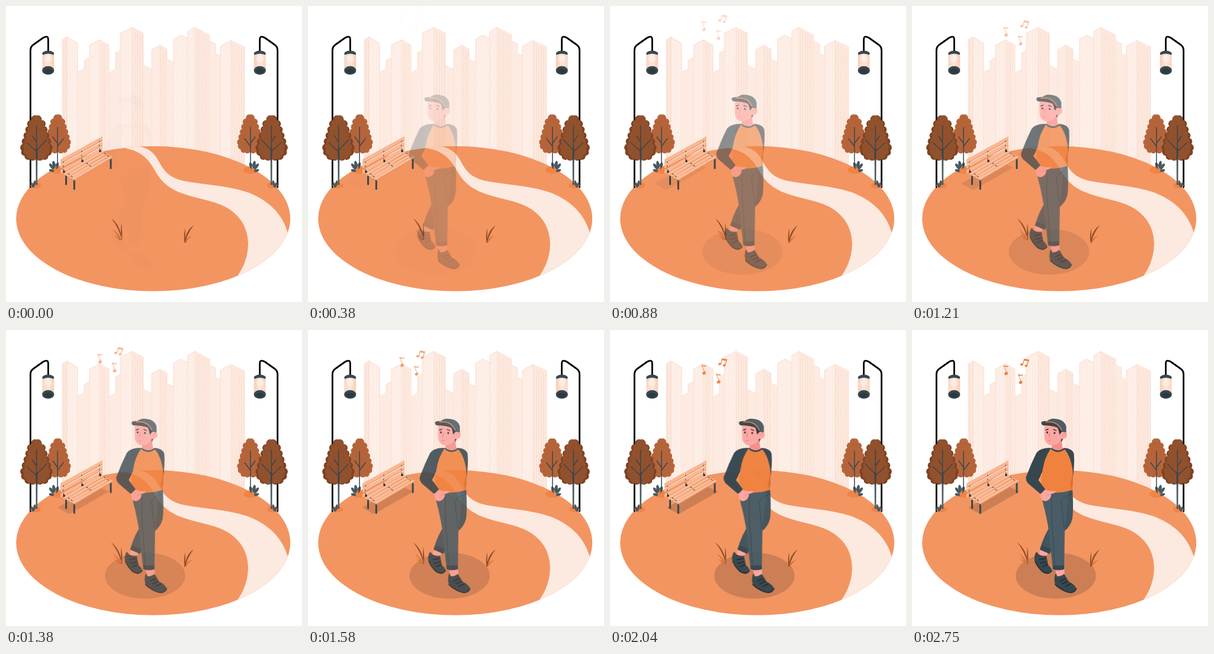
An HTML page without scripts that plays this animation: 500x500 px, repeating every 2830 ms.

```html
<!DOCTYPE html>
<html lang="en">
<head>
<meta charset="utf-8">
<title>Walk in the park</title>
<style>
  html, body { margin: 0; width: 100%; height: 100%; overflow: hidden; background: #fff; }
  svg { display: block; width: 100%; height: 100%; }
  .line { fill: none; stroke-linecap: round; stroke-linejoin: round; }

  .walker, .shadow, .notes { animation: slide 2830ms ease-out infinite both; }
  .walker { animation-timing-function: linear(.02, .27 13.4%, .57 31.1%, .725 42.8%, .87 55.8%, .98 72.1%, 1 84%, 1); }
  .shadow { animation-timing-function: linear(0, .07 13.4%, .36 31.1%, .61 42.8%, .87 55.8%, 1 65%, 1.035 73%, 1.02 84%, 1 97%, 1); }
  .notes { --from: translateY(-50px); animation-timing-function: linear(0, 0 11%, 1 73%, 1); }
  @keyframes slide {
    from { opacity: 0; transform: var(--from, translateX(-30px)); }
    to { opacity: 1; transform: none; }
  }
</style>
</head>
<body>
<svg viewBox="0 0 500 500">
  <defs>
    <linearGradient id="glass">
      <stop offset="0" stop-color="#fbd5c2"/>
      <stop offset=".5" stop-color="#fde6db"/>
      <stop offset="1" stop-color="#f9cdb6"/>
    </linearGradient>
    <pattern id="winL" width="4" height="4" patternUnits="userSpaceOnUse" patternTransform="skewY(-27)">
      <path d="M.8 1h2.2v1.6h-2.2z" fill="#fff" opacity=".75"/>
    </pattern>
    <pattern id="winR" width="4" height="4" patternUnits="userSpaceOnUse" patternTransform="skewY(27)">
      <path d="M.8 1h2.2v1.6h-2.2z" fill="#f7cbb5" opacity=".85"/>
    </pattern>
    <clipPath id="land"><ellipse cx="248.7" cy="359.3" rx="231.5" ry="122.5"/></clipPath>

    <!-- half of a lobed tree crown, around x = 0 -->
    <path id="half" d="M-1 0H0a7 7 0 0 1 9 8a6 6 0 0 1 5 10a6 6 0 0 1 3 10a6 6 0 0 1 3 10a6 6 0 0 1 3 10a6.500 6.500 0 0 1 2 11a6 6 0 0 1-5 9a6 6 0 0 1-9 6a7 7 0 0 1-11-1h-1z"/>
    <g id="crown"><use href="#half"/><use href="#half" transform="scale(-1 1)"/></g>

    <g id="side">
      <path class="line" d="M41.300 306V75q0-6.500 5.500-10L63 53.500q8.300-4.500 8.300 3V78" stroke="#000" stroke-width="2.800"/>
      <ellipse cx="71.200" cy="80.500" rx="10" ry="5" fill="#37474f"/>
      <path d="M61.200 83q10-5 20 0v25h-20z" fill="url(#glass)"/>
      <circle cx="71" cy="89" r="6" fill="#fff3ec" opacity=".6"/>
      <ellipse cx="71.200" cy="108.800" rx="10.200" ry="7.200" fill="#37474f"/>
      <ellipse cx="71.200" cy="110" rx="7" ry="4" fill="#2c3a42"/>

      <ellipse cx="88" cy="277" rx="11" ry="6" fill="#f08446"/>
      <g fill="#455a64">
        <ellipse cx="77" cy="271" rx="2.500" ry="6" transform="rotate(-38 77 271)"/>
        <ellipse cx="81" cy="268" rx="2.700" ry="6.500" transform="rotate(-10 81 268)"/>
        <ellipse cx="86" cy="270" rx="2.700" ry="6" transform="rotate(20 86 270)"/>
        <ellipse cx="77" cy="278" rx="4.500" ry="2.300" transform="rotate(15 77 278)"/>
      </g>
      <path d="M80 283q1-8 5-14q0 8-1 14zM86 283q2-6 8-9q-2 7-5 10z" fill="#f08446"/>
      <use href="#crown" transform="translate(87.500 183.500) scale(.81 .86)" fill="#b5643a"/>
      <path class="line" d="M87 205v66M87 237l10-13M87 232l-8-11" stroke="#37474f" stroke-width="1.500"/>

      <ellipse cx="50" cy="303" rx="9" ry="5" fill="#f08446"/>
      <g fill="#455a64">
        <ellipse cx="44" cy="302" rx="2" ry="5.500" transform="rotate(-25 44 302)"/>
        <ellipse cx="48" cy="300" rx="2" ry="5.500" transform="rotate(10 48 300)"/>
      </g>
      <path d="M47 307q3-6 11-6q-4 5-9 7z" fill="#f08446"/>
      <use href="#crown" transform="translate(51.300 185)" fill="#7c4324"/>
      <use href="#crown" transform="translate(51.800 185) scale(.84 .98)" fill="#92512d"/>
      <path d="M50.300 240h3l-.3 62h-2.400z" fill="#37474f"/>
      <path d="M52 262v38" stroke="#7d8478" stroke-width=".7"/>
      <path class="line" d="M51.600 202v50M51.500 244l17-18M51.500 246l-16-15M51.500 230l-7-11" stroke="#37474f" stroke-width="1.500"/>
    </g>

    <g id="slat">
      <path d="M0 0L71-39v6L0 6.500z" fill="#fab792"/>
      <path d="M0 6.500L71-33v1.400L0 8z" fill="#e98d5c"/>
    </g>
    <g id="plank">
      <path d="M0 0L66-38l4 2L4 3z" fill="#fbbd9a"/>
      <path d="M4 3L70-36v1.300L4 4.500z" fill="#e98d5c"/>
    </g>
    <g id="brace">
      <path class="line" d="M0 0v1.500M-.3 7v1.500M0 13l.8 3M8 20.500l2 1M13 24.500l2 1" stroke="#37474f" stroke-width="1.200"/>
      <circle cx="1" cy="17" r="1.900" fill="#263238"/>
    </g>
    <g id="note">
      <ellipse cx="5" cy="13.500" rx="3.100" ry="2.500" transform="rotate(-25 5 13.500)" fill="#ef8142"/>
      <path d="M7 13L2 2q4 1 7-.5L8.500.2Q4 1.500 0-.7L5.800 13z" fill="#ef8142"/>
    </g>
  </defs>

  <g id="city">
    <path d="M95 290V57l8-5 18 11v49l11-6V92l9-5V66l17-9 16 9v47l11-6V79l8-4V46l20-10 19 10v54l14 7V74l14-8 12 7v17l11 5V56l12-7 12 6V43l12-7 25 13v10l10 5v16l8 4V68l18-10 23 11v221z" fill="#fdebe2" stroke="#f9d8c8" stroke-width=".8"/>
    <path d="M104 55l16 9v226h-16zM142 67l16-8v231h-16zM194 47l18-9v252h-18zM284 57l11-6 11 6v233h-22zM308 44l11-6v252h-11zM363 69l16-9v230h-16z" fill="url(#winL)"/>
    <path d="M96 58l7-4v236h-7zM160 61l10 5v224h-10zM214 39l17 8v243h-17zM261 69l10 5v216h-10zM321 39l21 11v240h-21zM381 61l21 10v219h-21z" fill="url(#winR)"/>
    <path class="line" d="M103 52v238M121 112v178M141 87v203M158 57v233M174 113v177M193 75v215M213 36v254M232 100v190M246 107v183M260 66v224M283 95v195M307 55v235M319 36v254M344 59v231M362 84v206M380 58v232" stroke="#f9dccd" stroke-width=".7"/>
  </g>

  <g clip-path="url(#land)">
    <path d="M0 220h500v280H0z" fill="#f39561"/>
    <path d="M190 239C222 241 236 254 246 269C257 287 264 302 291 314C320 326 347 327 370 339C396 353 409 375 409 403Q408 435 387 461L500 480V420L476 383C466 348 440 326 406 314C372 303 335 302 303 296C278 291 268 281 259 264C251 250 245 239 214 235z" fill="#fce9df"/>
  </g>

  <g class="shadow" fill="#cc7f54">
    <ellipse cx="243" cy="415" rx="67.800" ry="39"/>
    <path d="M95 300l65-37 22 10-67 38z"/>
  </g>

  <use href="#side"/>
  <use href="#side" transform="translate(500) scale(-1 1)"/>

  <g id="bench">
    <path class="line" d="M101.500 288v13M115.300 294v15M177 259v15" stroke="#37474f" stroke-width="3"/>
    <use href="#slat" x="92" y="259"/>
    <use href="#slat" x="92" y="268"/>
    <use href="#slat" x="92" y="277"/>
    <use href="#plank" x="96" y="282.500"/>
    <use href="#plank" x="101" y="285.500"/>
    <use href="#plank" x="106" y="288.500"/>
    <use href="#plank" x="111" y="291"/>
    <use href="#brace" x="97" y="263"/>
    <use href="#brace" x="128" y="245"/>
    <use href="#brace" x="158" y="228"/>
  </g>

  <g id="grass">
    <path d="M195 396q-2-10-15-19q10 12 12 17zM194 395q-4-7-12-8q7 4 9 9z" fill="#d9743a"/>
    <path d="M195.500 395Q194 371 177.500 358.500Q190 373 195.500 395zM194.500 395Q193.500 378 195 366Q197 381 196 395z" fill="#8f4e2a"/>
    <path d="M302 400q2-9 13-12q-8 6-11 12z" fill="#d9743a"/>
    <path d="M302 400Q303 380 317 370.500Q307 383 302.500 400zM301.500 400Q299.500 386 303 375.500Q302.500 387 303 400z" fill="#8f4e2a"/>
  </g>

  <g class="notes">
    <use href="#note" x="154" y="60"/>
    <use href="#note" x="178.500" y="75"/>
    <path class="line" d="M187 59l2.500-9 7.500 1.300-3 9.500" stroke="#ef8142" stroke-width="1.200"/>
    <path d="M189 48.500l9 1.500-.8 3-8.500-1.500z" fill="#ef8142"/>
    <g fill="#ef8142"><ellipse cx="185.300" cy="58.300" rx="2.400" ry="2"/><ellipse cx="192.800" cy="60.500" rx="2.400" ry="2"/></g>
  </g>

  <g class="walker">
    <!-- back leg and shoe -->
    <path d="M217 370l-2 10 12 3 3-8z" fill="#fca6a2"/>
    <path d="M209 376Q205 385 208 392Q213 403 220 409Q231 416 236.500 407Q236 402 230 397L227 381Q219 383 213 378Q212 374 209 376z" fill="#37474f"/>
    <path class="line" d="M208 391Q213 402 221 408Q230 414 236 407" stroke="#263238" stroke-width="1.800"/>
    <path class="line" d="M215 388l10-2M217 394l10-2.500M220 400l9-4" stroke="#20292f" stroke-width="1.500"/>
    <path d="M240 277L271 268Q273 300 271 318Q268 332 256 341L240 365L233 378L216 370Q224 344 234 331z" fill="#42545d"/>
    <path d="M219.500 364l15 6-2.500 8-16-7z" fill="#37474f"/>

    <!-- front leg and shoe -->
    <path d="M242 402l2 14 14-1-1-13z" fill="#fca6a2"/>
    <path d="M242 412Q239 422 242 430Q250 438 262 443Q274 447 278 437Q275 430 265 425L257 412Q251 417 245 416Q244 411 242 412z" fill="#37474f"/>
    <path class="line" d="M242 430Q250 438 262 442.500Q273 446 277.500 437" stroke="#263238" stroke-width="1.800"/>
    <path class="line" d="M250 424l9-4M254 429l9-5M259 433l9-4" stroke="#20292f" stroke-width="1.500"/>
    <path d="M219 271Q219 286 224 303Q231 333 232 350Q235 378 238 404Q247 407 257 404L258 338Q263 304 264 272z" fill="#4a5d66"/>
    <path d="M238 397q10 2 19 0v7q-9 3-18.500 0z" fill="#37474f"/>
    <path class="line" d="M236 282Q235 322 238 345L241 396M271 276Q256 282 252 290Q255 315 257 334" stroke="#37474f" stroke-width="1"/>

    <!-- shirt and sleeves -->
    <path d="M256 199Q271 200 273.500 209Q275 228 271.500 250L266 238z" fill="#37474f"/>
    <path d="M232 201Q246 208 257 201Q268 212 271.500 238V270Q246 278 219 273Q218 252 219 238L224 215z" fill="#f0823f"/>
    <path d="M271.500 240l.2 21-3 9-1-10z" fill="#d96f32"/>
    <path d="M235 199Q216 199 210 208Q201 226 194 245Q190 252 196 259L217 277L225 269L213 253Q218 246 221 235Q224 215 234 201z" fill="#37474f"/>
    <path class="line" d="M213 253Q217 244 220 238" stroke="#263238" stroke-width=".8"/>
    <path d="M217 277L225 270Q233 273 243 272Q242 276 235 277Q236 284 229 288Q223 291 219 286z" fill="#fca6a2"/>
    <path class="line" d="M229 279q4 0 6-2" stroke="#e8817c" stroke-width=".8"/>

    <!-- head -->
    <path d="M236 188L253 182Q253 194 255 201Q246 208 236 202z" fill="#f58f8b"/>
    <path class="line" d="M235.500 200.500Q246 208.500 256.500 201" stroke="#37474f" stroke-width="2.600"/>
    <path d="M224 160Q223 174 224 184Q226 194 236 195Q249 194 252 183L254 164Q238 153 224 160z" fill="#fca6a2"/>
    <path d="M223 161Q236 161 246 165Q248 169 249 176L253 177L252 189Q256 186 258 170L254 160Q238 152 223 158z" fill="#263238"/>
    <path d="M250 176Q254 169 260 172Q264 177 260 182Q255 186 251 183z" fill="#fca6a2"/>
    <path class="line" d="M254 178q2-3 5-2" stroke="#e8817c" stroke-width=".9"/>
    <g fill="#263238"><ellipse cx="228.500" cy="173" rx="1.500" ry="1.800"/><ellipse cx="240.800" cy="174" rx="1.500" ry="1.800"/></g>
    <path class="line" d="M226 169l4-1.500M239 168l4.500 1.800" stroke="#263238" stroke-width="1.400"/>
    <path class="line" d="M233 174Q230 179 232.500 181M230 187q2-1.500 4 0" stroke="#e8706d" stroke-width="1"/>
    <path d="M227 155Q233 149 242 150Q257 151 260.500 163V173Q256 173 252 171Q248 161 236 157z" fill="#4a5d66"/>
    <path d="M219 155Q226 153 233 154.500Q247 157 253 171Q245 163 235 160.500Q227 159 222 161.500Q217 159 219 155z" fill="#37474f"/>
    <path class="line" d="M226 155.500Q246 153 252.500 169" stroke="#f0823f" stroke-width="1.500"/>
  </g>
</svg>
</body>
</html>
```
